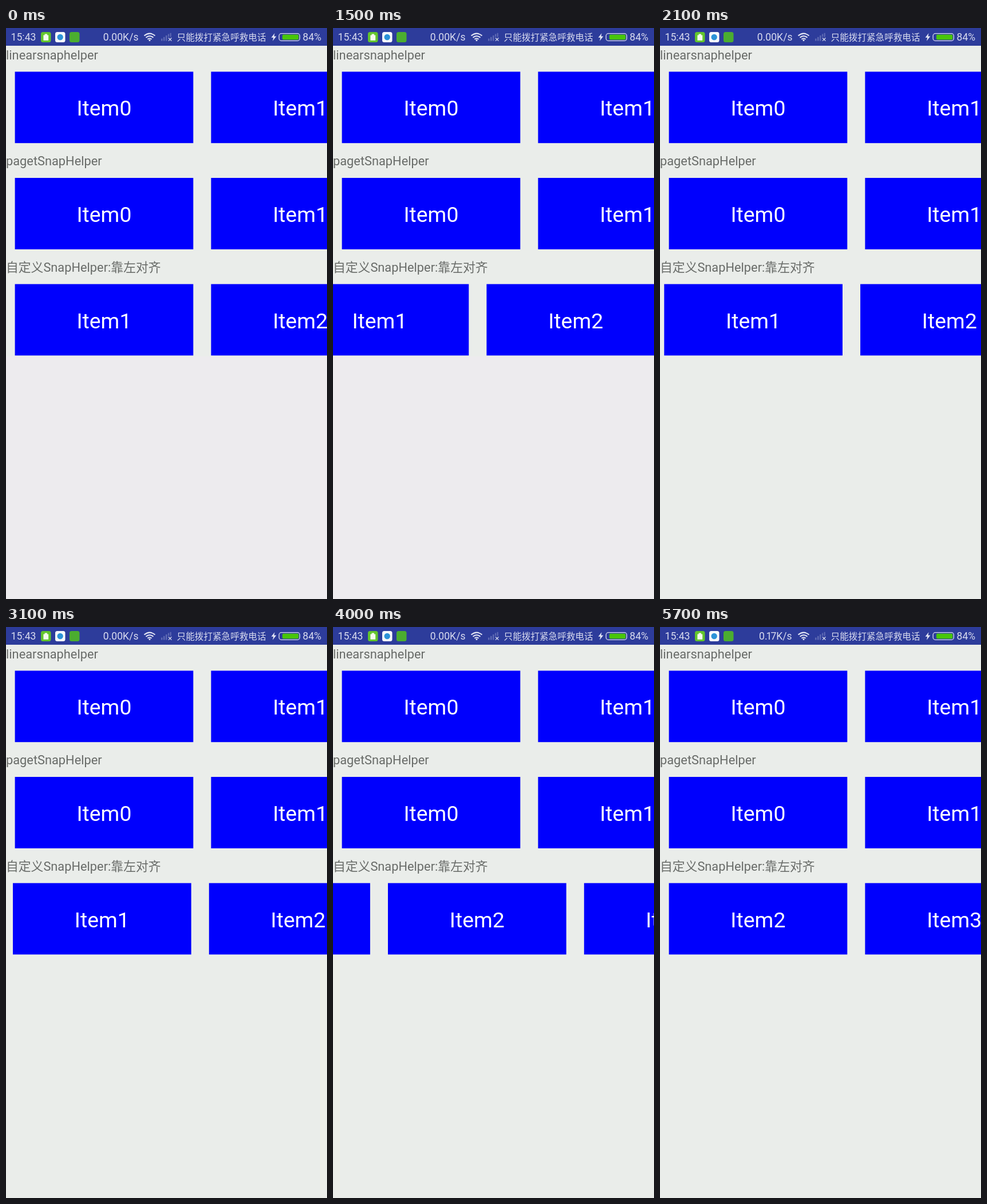
Animation of 561x998 px, one loop 6700 ms. Source, as an HTML page:

```html
<!DOCTYPE html>
<html lang="zh-CN">
<head>
<meta charset="utf-8">
<title>SnapHelper</title>
<style>
  html, body { margin: 0; width: 100%; height: 100%; overflow: hidden; background: #eaedea; }
  svg { display: block; width: 561px; height: 998px; }
  text { font-family: Roboto, "Noto Sans CJK SC", "Noto Sans CJK", sans-serif; white-space: pre; }
  .bar text { font-size: 17.6px; fill: #d9dcef; }
  .bar .note { font-size: 15.6px; }
  .label { font-size: 21.8px; fill: #686b68; }
  .item { font-size: 37.4px; fill: #fff; text-anchor: middle; }
</style>
</head>
<body>
<svg viewBox="0 0 561 998">
  <rect width="561" height="998" fill="#eaedea"/>
  <rect id="tint" y="574" width="561" height="424" fill="#edebee"/>
  <g id="rows"></g>

  <g class="bar">
    <rect width="561" height="31" fill="#2d3c9b"/>
    <text x="8.6" y="22">15:43</text>

    <rect x="61" y="7" width="17.5" height="18" rx="3.5" fill="#62c52c"/>
    <path d="M67.6 10.5h4.4v2h2.2v9.2h-8.8v-9.2h2.2z" fill="#f4fbef"/>
    <rect x="86" y="7" width="17.5" height="18" rx="3.5" fill="#f7fafc"/>
    <circle cx="94.7" cy="16" r="5.2" fill="#2c93d8"/>
    <rect x="111" y="7" width="17.5" height="18" rx="3.5" fill="#4bad30"/>

    <text id="idle" x="231.5" y="22" text-anchor="end">0.00K/s</text>
    <text id="busy" x="173" y="22">0.<tspan dx="-2">1</tspan><tspan dx="-2">7K/s</tspan></text>

    <g fill="none" stroke="#e3e6f4" stroke-width="2">
      <path d="M241.5 13.6Q251 5.6 260.5 13.6"/>
      <path d="M244.5 16.8Q251 11.2 257.5 16.8"/>
      <path d="M247.4 19.8Q251 16.8 254.6 19.8"/>
    </g>
    <circle cx="251" cy="21.6" r="1.5" fill="#e3e6f4"/>

    <g fill="#5c68b3">
      <rect x="271" y="18.5" width="2.6" height="4"/>
      <rect x="275" y="15.8" width="2.6" height="6.7"/>
      <rect x="279" y="13" width="2.6" height="9.5"/>
      <rect x="283" y="10.5" width="2.2" height="5"/>
      <rect x="286.6" y="8.8" width="2.2" height="6.7"/>
    </g>
    <path d="M284 17.2l5.4 5.4m0-5.4l-5.4 5.4" stroke="#d9dcef" stroke-width="1.3"/>

    <text class="note" x="298.6" y="22">只能拨打紧急呼救电话</text>
    <path d="M469.6 9l-6 7.8h3.7l-1.3 6 6.4-8.2h-3.9z" fill="#e3e6f4"/>
    <rect x="477.2" y="9.7" width="36.2" height="12.6" rx="4" fill="none" stroke="#d9dcef" stroke-width="1.3"/>
    <rect x="483" y="11.6" width="28.4" height="8.8" rx="2" fill="#48c60a"/>
    <text x="518.6" y="22">84%</text>
  </g>
</svg>
<script>
const LOOP = 6700, STEP = 100, PITCH = 342.8;
const NS = "http://www.w3.org/2000/svg";
const byId = id => document.getElementById(id);

function add(parent, tag, attrs, text) {
  const el = document.createElementNS(NS, tag);
  for (const k in attrs) el.setAttribute(k, attrs[k]);
  if (text) el.textContent = text;
  return parent.appendChild(el);
}

function addRow(label, base, top, first, count) {
  const rows = byId("rows");
  add(rows, "text", { class: "label", x: 0, y: base }, label);
  const list = add(rows, "g", {});
  for (let i = 0; i < count; i++) {
    const x = 15.6 + i * PITCH;
    add(list, "rect", { x, y: top, width: 311.7, height: 124.8, fill: "#0000fd" });
    add(list, "text", { class: "item", x: x + 155.8, y: top + 77 }, "Item" + (first + i));
  }
  return list;
}

addRow("linearsnaphelper", 54.6, 76.4, 0, 2);
addRow("pagetSnapHelper", 240.2, 262, 0, 2);
const strip = addRow("自定义SnapHelper:靠左对齐", 425.8, 447.6, 1, 3);

// Scroll distance at each step of a swipe, held between swipes.
const swipes = [
  { at: 1300, path: [12, 46, 90, 122, 136, 118, 64, 27, 8.3, 3, 1, 0] },
  { at: 3100, path: [3.6, 62, 150, 219, 219, 224, 230, 239, 250, 262.4, 275, 289,
                     311, 328, 338, 341.8, PITCH] }
];

function scrollAt(t) {
  let pos = 0;
  for (const { at, path } of swipes) {
    if (t < at) break;
    pos = path[Math.min(Math.floor((t - at) / STEP), path.length - 1)];
  }
  return pos;
}

function show(el, on) { el.style.display = on ? "" : "none"; }

function draw() {
  const t = performance.now() % LOOP;
  strip.setAttribute("transform", `translate(${-scrollAt(t)} 0)`);
  show(byId("tint"), t < 2000);
  show(byId("idle"), t < 5700);
  show(byId("busy"), t >= 5700);
  requestAnimationFrame(draw);
}
draw();
</script>
</body>
</html>
```
